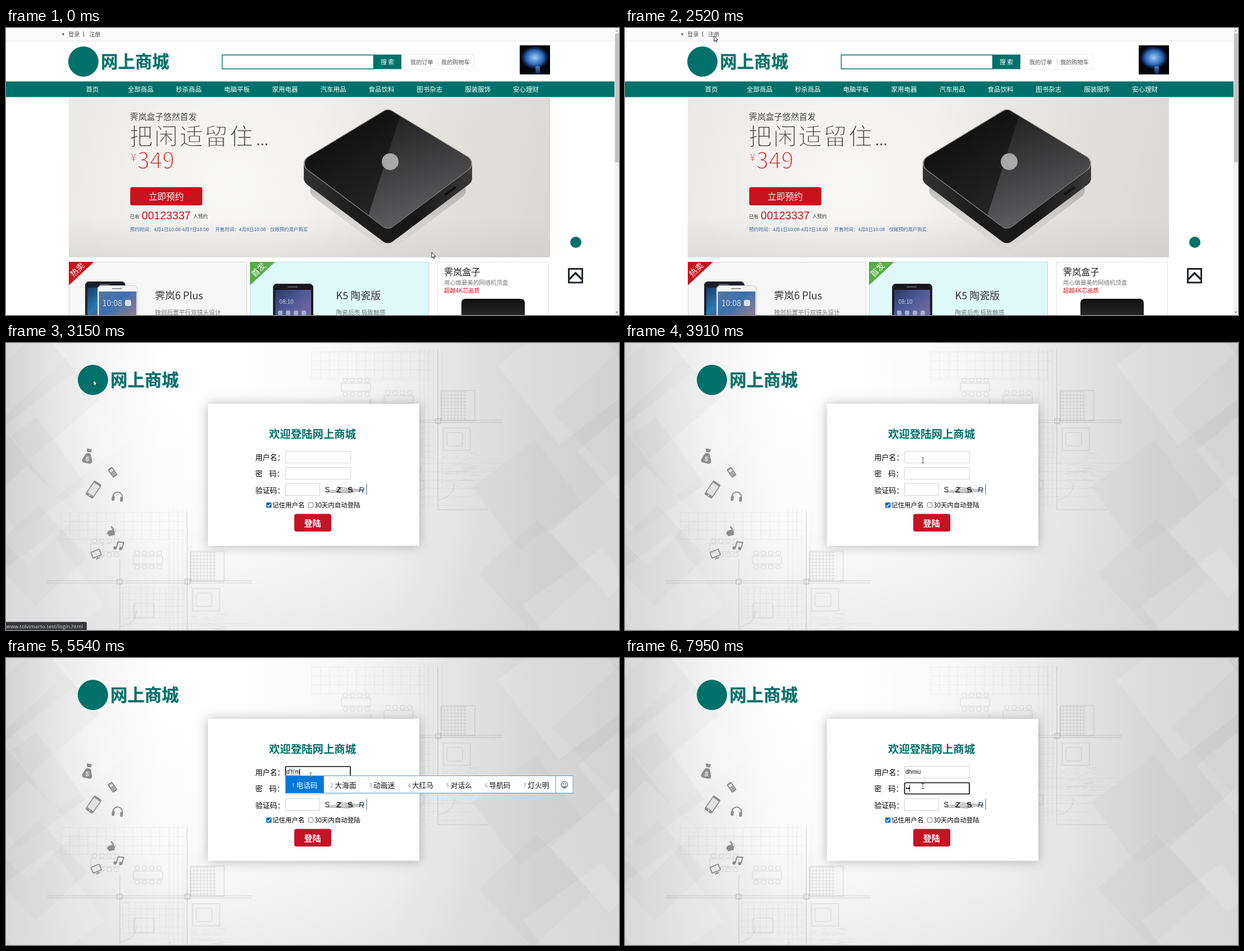
Animation, 1093 px wide and 513 px high, one loop 8000 ms. Source, as an HTML page with a canvas:

```html
<!DOCTYPE html>
<html lang="zh-CN">
<head>
<meta charset="utf-8">
<title>网上商城</title>
<style>
html, body { margin: 0; width: 100%; height: 100%; overflow: hidden; background: #fff; }
canvas { display: block; }
</style>
</head>
<body>
<canvas id="stage" width="1093" height="513"></canvas>
<script>
const W = 1093, H = 513, LOOP = 8000;
const TEAL = '#00716a', RED = '#c7131c';
const CJK = '"Noto Sans CJK SC", "Noto Sans CJK", sans-serif';
const ARIAL = '"Liberation Sans", "Noto Sans CJK SC", sans-serif';
const UI = '"Open Sans", "Noto Sans CJK SC", sans-serif';
const out = document.getElementById('stage').getContext('2d');
let c = out;

// ---------- helpers ----------
function text(s, x, y, size, color, { weight = 400, align = 'left', font = CJK } = {}) {
  c.font = `${weight} ${size}px ${font}`;
  c.textAlign = align;
  c.fillStyle = color;
  c.fillText(s, x, y + size * 0.37);
}
// Light lettering: the outline is painted over in the colour of the ground.
function thinText(s, x, y, size, color, ground) {
  text(s, x, y, size, color);
  c.strokeStyle = ground;
  c.lineWidth = size * 0.036;
  c.strokeText(s, x, y + size * 0.37);
}
function box(x, y, w, h, fill, r = 0) {
  c.fillStyle = fill;
  c.beginPath();
  c.roundRect(x, y, w, h, r);
  c.fill();
}
function frame(x, y, w, h, color, lw = 1, r = 0) {
  c.strokeStyle = color;
  c.lineWidth = lw;
  c.beginPath();
  c.roundRect(x, y, w, h, r);
  c.stroke();
}
function disc(x, y, r, fill) {
  c.fillStyle = fill;
  c.beginPath();
  c.arc(x, y, r, 0, 7);
  c.fill();
}
function arc(x, y, r, a0, a1, color, lw) {
  c.strokeStyle = color;
  c.lineWidth = lw;
  c.beginPath();
  c.arc(x, y, r, a0, a1);
  c.stroke();
}
function line(color, lw, ...p) {
  c.strokeStyle = color;
  c.lineWidth = lw;
  c.beginPath();
  for (let i = 0; i < p.length; i += 2) c.lineTo(p[i], p[i + 1]);
  c.stroke();
}
function poly(fill, r, ...p) {
  const n = p.length, at = i => [p[i % n], p[(i + 1) % n]];
  c.beginPath();
  c.moveTo((p[0] + p[n - 2]) / 2, (p[1] + p[n - 1]) / 2);
  for (let i = 0; i < n; i += 2) c.arcTo(...at(i), ...at(i + 2), r);
  c.closePath();
  c.fillStyle = fill;
  c.fill();
}
function fade(x0, y0, x1, y1, ...stops) {
  const g = c.createLinearGradient(x0, y0, x1, y1);
  stops.forEach((s, i) => g.addColorStop(i / (stops.length - 1), s));
  return g;
}
function glow(x, y, r, ...stops) {
  const g = c.createRadialGradient(x, y, 0, x, y, r);
  stops.forEach((s, i) => g.addColorStop(i / (stops.length - 1), s));
  return g;
}
function placed(x, y, angle, draw) {
  c.save();
  c.translate(x, y);
  c.rotate(angle);
  draw();
  c.restore();
}
function layer(draw) {
  const cv = document.createElement('canvas');
  cv.width = W;
  cv.height = H;
  c = cv.getContext('2d');
  draw();
  c = out;
  return cv;
}
function seeded(seed) {
  return () => (seed = seed * 16807 % 2147483647) / 2147483647;
}
function brand(x, y) {
  disc(x, y, 27, TEAL);
  text('网上商城', x + 32, y + 1, 30.5, '#b9c9c7', { weight: 700 });
  text('网上商城', x + 31, y, 30.5, TEAL, { weight: 700 });
}

// ---------- shop page ----------
function slab(fill, drop, inset = 0) {
  const x = 681, y = 241 + drop, rx = 161 - inset * 1.4;
  poly(fill, 14, x - rx, y, x, y - 98 + inset, x + rx, y, x, y + 121 - inset);
}
function drawDevice() {
  slab(fade(0, 290, 0, 408, 'rgba(95,95,95,.35)', 'rgba(170,170,170,0)'), 48, 8);
  const side = fade(528, 0, 833, 0, '#333', '#1b1b1b', '#171717', '#3a3a3a');
  for (let drop = 26; drop >= 1; drop--) slab(side, drop);
  slab('#888', 0);
  c.save();
  slab(fade(560, 180, 660, 340, '#0e0e0e', '#262627'), 0, 1.5);
  c.clip();
  poly(fade(700, 170, 750, 330, '#262627', '#5a5a5c'), 0, 708, 140, 850, 140, 850, 380, 632, 380);
  c.restore();
  disc(685, 239, 15, '#a8a8a8');
  line('#101010', 4, 783, 298, 802, 284);
}
function drawBanner() {
  c.save();
  c.beginPath();
  c.rect(112, 125, 858, 285);
  c.clip();
  box(112, 125, 858, 285, fade(112, 125, 970, 300, '#ebe9e7', '#f0efed', '#f0efed', '#e4e2df', '#dbd8d5'));
  box(112, 125, 858, 285, glow(400, 280, 270, 'rgba(255,255,255,.5)', 'rgba(255,255,255,0)'));
  box(112, 340, 858, 70, fade(0, 340, 0, 410, 'rgba(200,197,194,0)', 'rgba(200,197,194,.4)'));
  drawDevice();
  c.restore();
  text('霁岚盒子悠然首发', 221, 158, 14.9, '#444');
  [...'把闲适留住'].forEach((s, i) => thinText(s, 220 + i * 44.6, 193, 42, '#4a4a4a', '#f3f2f0'));
  text('...', 446, 200, 26, '#555');
  thinText('¥', 222, 231, 19, '#d0352f', '#f5f4f2');
  thinText('349', 234, 236, 40, '#d0352f', '#f5f4f2');
  box(221.5, 284.5, 128.5, 32.5, RED, 3);
  text('立即预约', 285.5, 301, 15.7, '#fff', { align: 'center' });
  text('已有', 221, 337, 8.5, '#333');
  text('00123337', 242, 335, 19.6, '#c9151e', { font: ARIAL });
  text('人预约', 334, 337, 8.6, '#333');
  const blue = '#41618f', f = { font: ARIAL };
  text('预约时间：4月1日10:08-4月7日18:00', 221, 360, 8.5, blue, f);
  text('开售时间：4月8日10:08', 373, 360, 8.5, blue, f);
  text('仅限预约用户购买', 471, 360, 8.4, blue, f);
}
function card(x, w, fill, label, color, title, note) {
  box(x, 418, w, 110, fill);
  frame(x + .5, 418.5, w - 1, 110, 'rgba(0,0,0,.12)');
  if (!label) return;
  poly(color, 0, x, 418, x + 45, 418, x, 460);
  placed(x + 15, 432, -Math.PI / 4, () => text(label, 0, 0, 14.5, '#fff', { align: 'center' }));
  text(title, x + 153.5, 478, 18, '#333');
  text(note, x + 153.5, 508, 10.7, '#777');
}
function phone(x, y, body, edge, inset, ...tones) {
  box(x, y, 72, 90, body, 7);
  frame(x + .5, y + .5, 71, 90, edge, 1, 7);
  box(x + 26, y + 5, 18, 1.5, '#777', 1);
  box(x + inset, y + 11, 72 - inset * 2, 80, fade(x, y + 11, x + 50, y + 65, ...tones));
}
function drawCards() {
  card(112, 318, '#f6f6f6', '热卖', '#c9141d', '霁岚6 Plus', '独创后置平行双镜头设计');
  phone(141, 453, '#1d1f26', '#353842', 4, '#16355c', '#2878b4', '#704d4c');
  phone(163, 460, '#f5f5f5', '#c8c8c8', 2.5, '#56789c', '#3c6fae', '#8a7c92');
  text('10:08', 172, 492, 14, '#d5e2f0');
  box(212, 486, 11, 11, '#d8e1e8', 3);

  card(435, 319, '#dff8fa', '首发', '#58ac46', 'K5 陶瓷版', '陶瓷后壳 极致触感');
  phone(476, 457, '#17181f', '#3b3d48', 4, '#28355f', '#4a5794', '#7468a0');
  text('08:10', 500, 489, 10, '#c9cfe6', { align: 'center' });
  for (let i = 0; i < 4; i++) box(485 + i * 14, 505, 8, 8, '#a5afd6', 2);

  card(769, 199, '#fff');
  text('霁岚盒子', 781, 436, 16.2, '#222');
  text('用心做最美的网络机顶盒', 781, 455, 10.4, '#777');
  text('超越4K芯画质', 781, 469, 10.3, '#c9141d');
  box(812, 484, 113, 60, fade(0, 484, 0, 513, '#111', '#252525'), 7);
}
function drawPortrait() {
  box(916, 31, 54, 52, '#02040a');
  c.save();
  c.translate(943, 53);
  c.scale(1.2, 1);
  disc(0, 0, 20, glow(0, 0, 20, '#a4cbf2', '#5f98d8', '#2b60ae', 'rgba(14,42,100,.3)'));
  c.restore();
  box(944, 68, 8, 15, fade(0, 68, 0, 83, '#4a82c0', '#0a1f48'), 3);
}
function drawShop() {
  box(0, 0, W, H, '#fff');
  box(0, 0, W, 23, '#fafafa');
  box(0, 23, W, 1, '#e8e8e8');
  disc(102, 11, 1.7, '#444');
  text('登录', 111, 11, 10.3, '#555');
  box(138, 6, 1, 10, '#555');
  text('注册', 148, 11, 10.3, '#555');
  brand(138, 60);
  frame(385.5, 48.2, 270, 24.8, TEAL, 1.4);
  box(655, 47.5, 50, 26, TEAL);
  text('搜 索', 680, 61, 10.8, '#fff', { align: 'center', weight: 500 });
  frame(711.5, 47.5, 123, 26, '#ebebeb');
  text('我的订单', 721, 61, 10.2, '#555');
  box(770, 54, 1, 13, '#ddd');
  text('我的购物车', 776, 61, 10.2, '#555');
  drawPortrait();

  box(0, 95.6, 1085, 27.8, TEAL);
  ['首页', '全部商品', '秒杀商品', '电脑平板', '家用电器', '汽车用品', '食品饮料', '图书杂志', '服装服饰', '安心理财']
    .forEach((s, i) => text(s, 154 + i * 85.9, 110, 11.5, '#fff', { align: 'center' }));
  drawBanner();
  drawCards();

  disc(1016, 383, 10, TEAL);
  frame(1003.5, 430.5, 24, 24.5, '#23262e', 3);
  line('#23262e', 3.5, 1004.5, 449, 1015.5, 438, 1026.5, 449);
  box(1085, 0, 8, H, '#f1f1f1');
  box(1086, 10, 6.5, 230, '#c1c1c1');
  poly('#888', 0, 1087, 6, 1089, 3.5, 1091, 6);
  poly('#555', 0, 1087, 507, 1091, 507, 1089, 509.5);
}

// ---------- login page ----------
function grid(x, y, w, h, step, color) {
  for (let i = 0; i <= w; i += step) line(color, .7, x + i, y, x + i, y + h);
  for (let j = 0; j <= h; j += step) line(color, .7, x, y + j, x + w, y + j);
}
function blueprint(dx, dy) {
  const rnd = seeded(77);
  const pale = 'rgba(110,110,110,.13)', mid = 'rgba(100,100,100,.24)', dark = 'rgba(90,90,90,.4)';
  c.save();
  c.translate(dx, dy);
  grid(545, 16, 218, 48, 16, pale);
  grid(776, 87, 45, 52, 6, mid);
  grid(655, 150, 110, 55, 11, pale);
  for (let i = 0; i < 40; i++) {
    const x = 780 + rnd() * 50, y = 195 + rnd() * 60;
    line(pale, .7, x, y, x + 4 + rnd() * 20, y - 4 + rnd() * 8);
  }
  for (let i = 0; i < 6; i++) {
    line(pale, .7, 738 + i * 8, 10, 738 + i * 8, 310 - i * 9);
    line(pale, .7, 660, 215 + i * 15, 885 - i * 14, 215 + i * 15);
  }
  for (const y of [138, 142]) line(mid, 1.2, 520, y, 885, y);
  line(mid, 1, 650, 100, 650, 290);
  line(mid, 1, 770, 15, 770, 298, 860, 298);
  frame(776, 85, 60, 54, mid, .9);
  for (const x of [645, 766]) frame(x, 135, 9, 9, dark, .9);
  for (let k = 0; k < 2; k++) {
    const x = 598 + k * 76, y = 72 + k * 22;
    frame(x, y, 52, 14, mid, .8);
    for (let i = 0; i < 8; i++) frame(x + 3 + i % 4 * 13, y + (i < 4 ? -9 : 16), 8, 7, mid, .8, 2);
  }
  frame(780, 152, 48, 40, mid, .8);
  frame(786, 160, 28, 24, mid, .8, 3);
  frame(675, 178, 36, 26, mid, .8, 2);
  frame(715, 245, 30, 18, mid, .8, 4);
  for (let i = 0; i < 3; i++) arc(650 + i * 60, 190 + i * 30, 30, 0, Math.PI / 2, mid, .8);
  c.restore();
}
function drawBackdrop() {
  const rnd = seeded(4242);
  box(0, 0, W, H, fade(0, 0, W, 0, '#d1d1d1', '#e9e9e9', '#fafafa', '#fcfcfc', '#f8f8f8', '#f1f1f1', '#e2e2e2', '#d5d5d5', '#d0d0d0'));
  box(0, 0, W, H, glow(330, 60, 330, 'rgba(255,255,255,.9)', 'rgba(255,255,255,0)'));
  box(0, 330, W, 183, fade(0, 330, 0, H, 'rgba(215,215,215,0)', 'rgba(215,215,215,.4)'));
  // large soft facets along both sides
  for (let i = 0; i < 14; i++) {
    const x = i % 2 ? 860 + rnd() * 240 : rnd() * 130 - 20;
    const y = 20 + i * 36, size = 110 + rnd() * 70;
    const tone = i % 4 < 2 ? 'rgba(255,255,255,.13)' : 'rgba(150,150,150,.07)';
    placed(x, y, .75 + rnd() * .2, () => box(-size / 2, -size / 2, size, size, tone));
  }
  blueprint(0, 0);
  blueprint(-447, 287);
}
function drawIcons() {
  const g = '#8e8e8e', pale = '#e9e9e9';
  placed(146, 203, .2, () => {
    poly(g, 4, -4, -6, 4, -6, 11, 12, -11, 12);
    poly(g, 1, -5, -14, 5, -14, 3, -8, -3, -8);
    line(pale, 1, -5, -7, 5, -7);
    text('$', 0, 4, 12, pale, { weight: 700, align: 'center', font: ARIAL });
  });
  placed(190, 231, -.6, () => {
    box(-5, -9, 10, 18, g, 2);
    box(-3, -6, 6, 5, pale);
    for (let i = 0; i < 6; i++) box(-3 + i % 3 * 2.3, 1 + (i / 3 | 0) * 3, 1.4, 1.6, pale);
  });
  placed(156, 262, .6, () => {
    box(-8, -15, 16, 30, g, 3);
    box(-6.3, -11, 12.6, 21, '#e2e2e2');
    disc(0, 12.3, 1.2, pale);
  });
  placed(199, 275, .1, () => {
    arc(0, 0, 8.5, Math.PI, 0, g, 2);
    for (const x of [-10, 5]) box(x, -1, 5, 9, g, 2);
  });
  placed(188, 338, -.2, () => {
    c.fillStyle = g;
    c.beginPath();
    c.ellipse(-1, 1, 7, 4.7, 0, 0, 7);
    c.ellipse(5, -2, 3.5, 3, 0, 0, 7);
    c.ellipse(3, -7, 1.4, 4, -.5, 0, 7);
    c.fill();
    box(-6, 4, 11, 2.5, g, 1);
  });
  placed(201, 362, .3, () => {
    for (const s of [-5, 5]) disc(s, 5 - s / 5, 3, g);
    line(g, 2, -3, 6, -3, -6, 7, -8, 7, 4);
  });
  placed(161, 377, -.4, () => {
    frame(-8, -6, 16, 11, g, 1.8, 1);
    line(g, 1.8, 0, 5, 0, 8);
    line(g, 1.8, -4, 8.5, 4, 8.5);
  });
}
function drawCaptcha() {
  ['#666', '#222', '#222', '#47697f'].forEach((color, i) =>
    placed(573 + i * 20.4, 262, .15 * Math.sin(i * 2.5), () =>
      text('SZSR'[i], 0, 0, 14, color, { weight: 700, align: 'center', font: ARIAL })));
  for (let i = 0; i < 4; i++) line('#444', .8, 570 + i * 9, 266 - i * 2.5, 612 + i * 9, 268 - i * 1.5);
  box(642.5, 252, 1, 19, '#555');
}
function drawLogin() {
  drawBackdrop();
  drawIcons();
  brand(155, 66);
  c.shadowColor = 'rgba(0,0,0,.28)';
  c.shadowBlur = 18;
  box(360, 108.5, 377, 254, '#fff');
  c.shadowBlur = 0;
  c.shadowColor = 'transparent';
  text('欢迎登陆网上商城', 546.5, 163, 19.4, TEAL, { weight: 700, align: 'center' });
  ['用户名：', '密', '验证码：'].forEach((s, i) => text(s, 444.5, 204 + i * 29.5, 13, '#000'));
  text('码：', 469.5, 233.5, 13, '#000');
  for (let i = 0; i < 3; i++) frame(498.5, 193.5 + i * 29, i < 2 ? 116 : 61, 21, '#d2d2d2');
  drawCaptcha();
  box(464, 285, 9.5, 9.5, '#0b6cc0', 1.5);
  line('#fff', 1.4, 465.8, 290, 468, 292.2, 471.8, 287.2);
  text('记住用户名', 475, 290, 11.5, '#000');
  frame(539, 285.5, 8.5, 8.5, '#777', 1, 1.5);
  text('30天内自动登陆', 550, 290, 11.5, '#000');
  box(514, 305.5, 66, 31.5, '#c51326', 4);
  text('登陆', 546.5, 322, 15, '#fff', { weight: 700, align: 'center' });
}

// ---------- moving parts ----------
const OPEN = 3150, FOCUS = 4230, COMMIT = 6390, PASS = 7100;
const STEP = 76;
const KEYS = [5160, 5390, 5540, 5630, 5710], DOTS = [7800, 7950];

// each leg eases out, with its own power for x and y
const legs = [
  { from: 970, to: 1040, x: 759, y: 397, px: 1, py: 1 },
  { from: 1350, to: 1500, x: 734, y: 386, px: 1, py: 1 },
  { from: 1820, to: 2760, x: 121, y: 11, px: 1.9, py: 3.3 },
  { from: OPEN, to: 3440, x: 400, y: 206, px: .6, py: 1.5 },
  { from: 3520, to: 4060, x: 543, y: 210, px: 1.8, py: 1.8 },
  { from: 6640, to: PASS, x: 531, y: 229, px: 1.5, py: 1.5 }
];
function pointer(t) {
  let x = 759, y = 401;
  for (const leg of legs) {
    if (t < leg.from) break;
    const n = Math.round((leg.to - leg.from) / STEP) + 1;
    const left = 1 - Math.min(n, 1 + Math.floor((t - leg.from) / STEP)) / n;
    x += (leg.x - x) * (1 - left ** leg.px);
    y += (leg.y - y) * (1 - left ** leg.py);
  }
  return [x, y];
}
function drawPointer(t) {
  const [x, y] = pointer(t), login = t >= OPEN;
  const inField = login && x > 498 && x < 615 && y > 193 && (y - 193) % 29 < 22;
  const onLink = !login && x < 131 && y < 18;
  placed(x, y, 0, () => {
    if (inField) {
      line('rgba(255,255,255,.5)', 2, 0, -4, 0, 4);
      line('#555', 1, 0, -4, 0, 4);
      for (const s of [-4.5, 4.5]) line('#555', 1, -2.5, s, 2.5, s);
      return;
    }
    c.lineJoin = 'round';
    if (onLink) poly('#fff', 1, -1.5, 0, 1, 0, 1, 4.5, 5, 6, 5, 10, 3.5, 13, -2, 13, -4.5, 8, -3.5, 7, -1.5, 9);
    else poly('#fff', 0, 0, 0, 0, 10, 2.3, 8, 3.9, 11.3, 5.4, 10.6, 3.8, 7.3, 7, 7.2);
    c.strokeStyle = '#111';
    c.lineWidth = .9;
    c.stroke();
  });
}
function drawStatus() {
  box(0, 498.5, 144, 15, '#35373a', [0, 3, 0, 0]);
  text('www.tolvimarto.test/login.html', 0, 506.5, 9.5, '#d8dadc', { font: UI });
}

const composed = ['d', "d'h", "d'h'm", "d'h'mi", 'dhmiu'];
const candidates = [
  '的 到 大 都 对 等 点',
  '电话 大会 动画 导航 对话 大海 灯火',
  '电话码 大海面 动画迷 大红马 对话么 导航码 灯火明',
  '动画迷 大海米 电话密 大红米 对话迷 导航迷 灯火谜',
  '电话喵 电话 大会 动画 导航 对话 大海'
];
function drawCandidates(words) {
  const list = words.split(' ');
  const cell = s => 31 + 12.6 * s.length;
  const w = list.reduce((sum, s) => sum + cell(s), 32);
  box(498, 210.5, w, 31.5, '#fff');
  let x = 498;
  list.forEach((s, i) => {
    if (!i) box(x, 211, cell(s), 31, '#0078d7');
    text(i + 1, x + 12, 228, 8.5, i ? '#777' : '#fff', { font: UI });
    text(s, x + 19.5, 227, 12.7, i ? '#111' : '#fff');
    x += cell(s);
  });
  frame(498.5, 210.5, w - 1, 31, '#4a9bd6');
  line('#4a9bd6', 1, x + .5, 211, x + .5, 242);
  arc(x + 16, 226.5, 5.8, 0, 7, '#222', 1);
  arc(x + 16, 228, 3, 0, Math.PI, '#222', 1);
  for (const s of [-2, 2]) disc(x + 16 + s, 225, .9, '#222');
}
function drawSuggestions() {
  c.shadowColor = 'rgba(0,0,0,.4)';
  c.shadowBlur = 3;
  box(498, 213.5, 137, 166.5, '#292a2d', 2);
  c.shadowBlur = 0;
  c.shadowColor = 'transparent';
  ['11', '沐禾', '111', 'aaa', 'vtr', 'xxx']
    .forEach((s, i) => text(s, 506.5, 232 + i * 25.8, 9.5, '#e8eaed', { font: UI }));
}
function drawForm(t) {
  if (t < FOCUS) return;
  const past = times => times.filter(s => t >= s).length;
  const onPass = t >= PASS, typed = past(KEYS), composing = typed && t < COMMIT;
  frame(498.5, onPass ? 223 : 194, 115.5, 20, '#101010', 1.7, 2);
  let caretX = 500;
  if (typed) {
    const s = composed[typed - 1];
    text(s, 500, 203.5, 10, '#000', { font: ARIAL });
    caretX += c.measureText(s).width;
    if (composing) line('#777', .7, 500, 209, caretX, 209);
  }
  if (onPass) {
    const dots = past(DOTS);
    for (let i = 0; i < dots; i++) disc(502.2 + i * 3.6, 233, 1.5, '#000');
    caretX = 500 + dots * 3.6;
  }
  const lastInput = Math.max(...[FOCUS, ...KEYS, COMMIT, PASS, ...DOTS].filter(s => t >= s));
  if ((t - lastInput) % 1060 < 530) box(Math.floor(caretX), onPass ? 227 : 198, 1, 11.5, '#000');
  if (!typed) drawSuggestions();
  if (composing && t >= KEYS[0] + STEP - 6) drawCandidates(candidates[typed - 1]);
}

const shop = layer(drawShop), login = layer(drawLogin);
function render(now) {
  const t = now % LOOP;
  out.drawImage(t < OPEN ? shop : login, 0, 0);
  if (t >= OPEN) drawForm(t);
  if (t >= 2760 && t < 3600) drawStatus();
  drawPointer(t);
}
const begin = performance.now();
function tick() {
  render(performance.now() - begin);
  requestAnimationFrame(tick);
}
tick();
</script>
</body>
</html>
```
